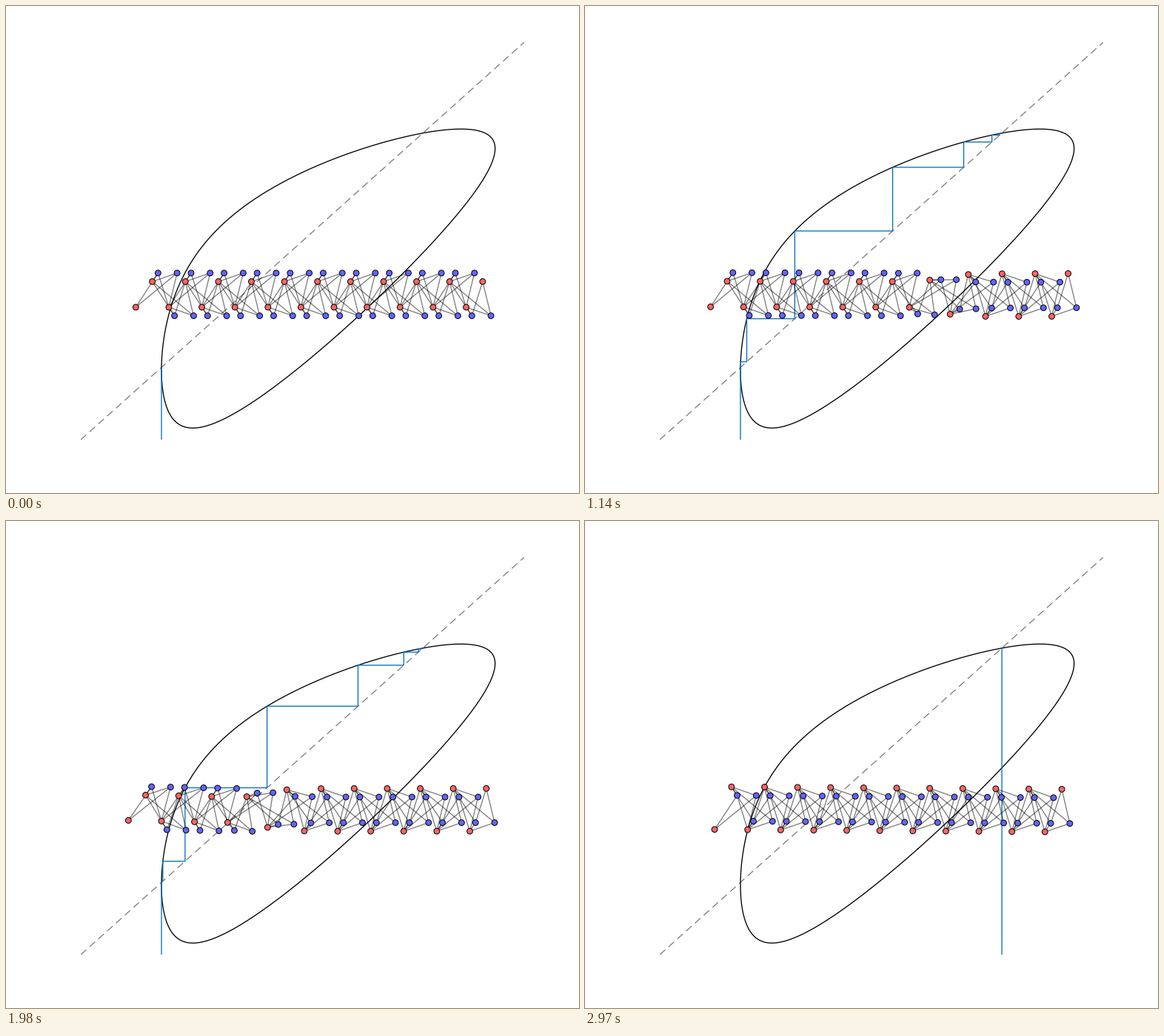
Recreate the animation shown at these times as a matplotlib script. Size 774 by 658 pixels, loop 3 s.

```python
import numpy as np
import matplotlib.pyplot as plt
from matplotlib.animation import FuncAnimation
from matplotlib.collections import LineCollection

W, H, DPI = 774, 658, 100
PX = 72 / DPI
FRAMES, INTERVAL = 100, 30
LEFT, RIGHT, TOP, BOTTOM = 101, 700, 49, 586
LO, HI = 1.45, 3.0
LINE = 1.33 * PX

# One module: three red joints, two blue joints, every red tied to every blue.
RED = np.array([-np.sqrt(3) / 2 - 0.5j, 1j, np.sqrt(3) / 2 - 0.5j])
BLUE = np.array([0.3 + 1.5j, 1.3 + 1.5j])
SQ = np.abs(RED[:, None] - BLUE[None, :]) ** 2
MODULES = 20
REDS = MODULES + 2
SHORT, LONG = np.sqrt(3), np.sqrt(7)

ARM_A, ARM_B = np.sqrt(SQ[1])
MID, AMP = ARM_B, ARM_A


def module(t):
    """Local positions of the three reds and two blues at linkage angle t."""
    w = MID - AMP * np.cos(t)
    signs = (-1, np.where(t < 0, -1, 1), -1)
    pts = []
    for (a, b), sign in zip(SQ, signs):
        x = (a - b + w * w) / (2 * w)
        pts.append(x + 1j * sign * np.sqrt(np.maximum(a - x * x, 0)))
    return pts + [0 * w + 0j, w + 0j]


def spans(t):
    r0, r1, r2, _, _ = module(t)
    return np.abs(r1 - r0), np.abs(r2 - r1)


# Monotone branch of the map d[k] -> d[k+1] between its two fixed points
T_FIX = np.arccos((MID - 1) / AMP)
T = np.linspace(-T_FIX, T_FIX, 40001)
D1, D2 = spans(T)


def forward(d):
    return np.interp(d, D1, D2)


def backward(d):
    return np.interp(d, D2, D1)


def sweep(n=60):
    """All spans d[sample, k] while the front travels from right to left."""
    enter = 1.9
    leave = forward(enter)
    rows = []
    for k in range(MODULES, -1, -1):
        a = SHORT if k == MODULES else enter
        b = LONG if k == 0 else leave
        d = np.zeros((n, MODULES + 1))
        d[:, k] = np.linspace(a, b, n, endpoint=k == 0)
        for i in range(k, 0, -1):
            d[:, i - 1] = backward(d[:, i])
        for i in range(k, MODULES):
            d[:, i + 1] = forward(d[:, i])
        rows.append(d)
    return np.vstack(rows)


def assemble(d):
    """Joint positions for each row of spans: reds first, then blue pairs."""
    reds = [0 * d[:, 0] + 0j, d[:, 0] + 0j]
    blues = []
    for k in range(MODULES):
        local = module(np.interp(d[:, k + 1], D2, T))
        if k % 2:
            local = [np.conj(p) for p in local]
        turn = (reds[k + 1] - reds[k]) / (local[1] - local[0])
        turn /= np.abs(turn)
        r2, a, b = (reds[k + 1] + turn * (p - local[1]) for p in local[2:])
        reds.append(r2)
        blues += [a, b]
    return np.array(reds + blues).T


def settle(p):
    """Remove rigid motion: fixed centroid, no net rotation between samples."""
    axis = p[0, MODULES] - p[0, 0]
    first = p[0] * np.conj(axis) / np.abs(axis)
    centre = np.mean(first - first[0] + RED[0])
    q = p - p.mean(axis=1, keepdims=True)
    q[0] *= np.conj(axis) / np.abs(axis)
    for i in range(1, len(q)):
        c = np.vdot(q[i - 1], q[i])
        q[i] *= np.conj(c) / np.abs(c)
    return q + centre


d_path = sweep()
p_path = settle(assemble(d_path))
steps = np.sqrt(np.sum(np.abs(np.diff(p_path, axis=0)) ** 2, axis=1))
arc = np.concatenate([[0], np.cumsum(steps)])

# Front timing: frame, span index, span value
MARKS = [(18, 17, 2.234), (38, 13, 2.264), (48, 11, 2.252),
         (66, 7, 2.101), (81, 4, 2.2095)]
key_t = [0] + [m[0] for m in MARKS] + [FRAMES - 1]
key_s = [0] + [np.interp(v, d_path[:, k], arc) for _, k, v in MARKS] + [arc[-1]]
travel = np.interp(np.arange(FRAMES), key_t, key_s)


def resample(path):
    return np.array([np.interp(travel, arc, col) for col in path.T]).T


spans_at = resample(d_path)
joints_at = resample(p_path) / 15 + (1.7 + 2j)
EDGES = np.array([(k + i, REDS + 2 * k + j)
                  for k in range(MODULES) for j in range(2) for i in range(3)])
COLORS = ([(1, 100 / 255, 100 / 255)] * REDS
          + [(100 / 255, 100 / 255, 1)] * (2 * MODULES))

fig = plt.figure(figsize=(W / DPI, H / DPI), dpi=DPI, facecolor="white")
ax = fig.add_axes([LEFT / W, 1 - BOTTOM / H, (RIGHT - LEFT) / W, (BOTTOM - TOP) / H])
ax.set_xlim(LO, HI)
ax.set_ylim(LO, HI)
ax.axis("off")

ax.plot([LO, HI], [LO, HI], color="black", alpha=0.5, lw=LINE,
        ls=(0, (7.5, 4.5)), dash_capstyle="butt", zorder=1)
ax.plot(*spans(np.linspace(-np.pi, np.pi, 1500)), color="black", lw=LINE, zorder=2)
cobweb, = ax.plot([], [], color=(0, 114 / 255, 189 / 255), lw=LINE, snap=False,
                  solid_joinstyle="miter", solid_capstyle="butt", zorder=3)
bars = LineCollection([], colors=[(0, 0, 0, 0.5)], linewidths=LINE, zorder=4)
ax.add_collection(bars, autolim=False)
dots = ax.scatter(joints_at[0].real, joints_at[0].imag, s=(7.8 * PX) ** 2,
                  c=COLORS, edgecolors="black", linewidths=PX, zorder=5)


def update(i):
    d, z = spans_at[i], joints_at[i]
    cobweb.set_data(np.repeat(d, 2), np.concatenate([[LO], np.repeat(d[1:], 2), d[-1:]]))
    xy = np.column_stack([z.real, z.imag])
    bars.set_segments(xy[EDGES])
    dots.set_offsets(xy)
    return cobweb, bars, dots


anim = FuncAnimation(fig, update, frames=FRAMES, interval=INTERVAL,
                     repeat=True, repeat_delay=0, blit=False)
plt.show()
```
